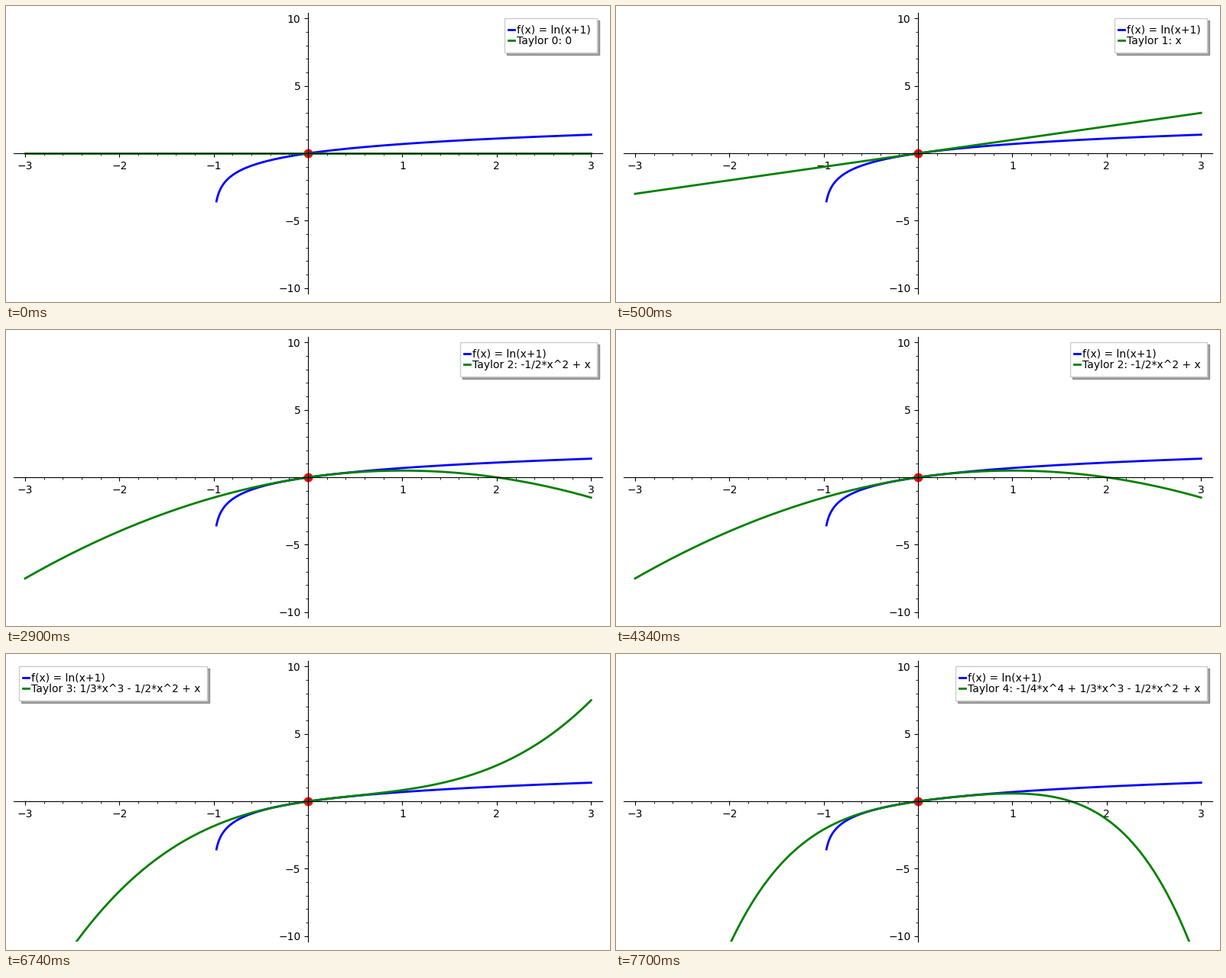
Recreate the animation shown at these times as a matplotlib script. Size 790 by 388 pixels, loop 8000 ms.

```python
import numpy as np
import matplotlib.pyplot as plt
from matplotlib.animation import FuncAnimation
from matplotlib.ticker import FuncFormatter, MultipleLocator

W, H, DPI = 790, 388, 100
LEFT, RIGHT, TOP, BOTTOM = 10.2, 780.0, 9.4, 376.9
TICK_MS, LOOP_MS = 100, 8000
STARTS = [0, 500, 2900, 5300, 7700]  # ms at which each degree appears

plt.rcParams.update({"font.family": "DejaVu Sans", "font.size": 10})

fig = plt.figure(figsize=(W / DPI, H / DPI), dpi=DPI, facecolor="white")
ax = fig.add_axes([LEFT / W, 1 - BOTTOM / H, (RIGHT - LEFT) / W, (BOTTOM - TOP) / H])
ax.set(xlim=(-3.12, 3.12), ylim=(-10.4, 10.4))


def style_axis(axis, major, minor):
    axis.set_major_locator(MultipleLocator(major))
    axis.set_minor_locator(MultipleLocator(minor))
    axis.set_major_formatter(FuncFormatter(tick_label))


def tick_label(value, _):
    n = round(value)
    return "" if n == 0 else str(n).replace("-", "\u2212")


style_axis(ax.xaxis, 1, 0.2)
style_axis(ax.yaxis, 5, 1)
for side in ("left", "bottom"):
    ax.spines[side].set_position(("data", 0))
for side in ("right", "top"):
    ax.spines[side].set_visible(False)


def taylor(x, degree):
    return sum(((-1) ** (k + 1) * x**k / k for k in range(1, degree + 1)), 0 * x)


def taylor_label(degree):
    text = ""
    for k in range(degree, 0, -1):
        negative = k % 2 == 0
        if text:
            text += " - " if negative else " + "
        elif negative:
            text = "-"
        text += "x" if k == 1 else f"1/{k}*x^{k}"
    return f"Taylor {degree}: {text or '0'}"


# log-spaced towards the pole at x = -1
log_x = np.geomspace(0.0285, 4, 400) - 1
poly_x = np.linspace(-3, 3, 400)

ax.scatter([0], [0], s=50, color="red", linewidths=1.5, zorder=0)
ax.plot(log_x, np.log1p(log_x), color="blue", lw=2, label="f(x) = ln(x+1)")
(approx,) = ax.plot(poly_x, 0 * poly_x, color="green", lw=2)


def draw(i):
    degree = sum(i * TICK_MS >= start for start in STARTS) - 1
    approx.set_ydata(taylor(poly_x, degree))
    approx.set_label(taylor_label(degree))
    ax.legend(
        loc="upper left" if degree == 3 else "upper right",
        borderpad=0.6, handlelength=0.05, handletextpad=0.5, labelspacing=0.02,
        numpoints=2, fancybox=False, shadow=True, framealpha=1,
    )
    return []


anim = FuncAnimation(fig, draw, frames=LOOP_MS // TICK_MS, interval=TICK_MS,
                     init_func=lambda: draw(0), repeat=True, repeat_delay=0)
plt.show()
```
